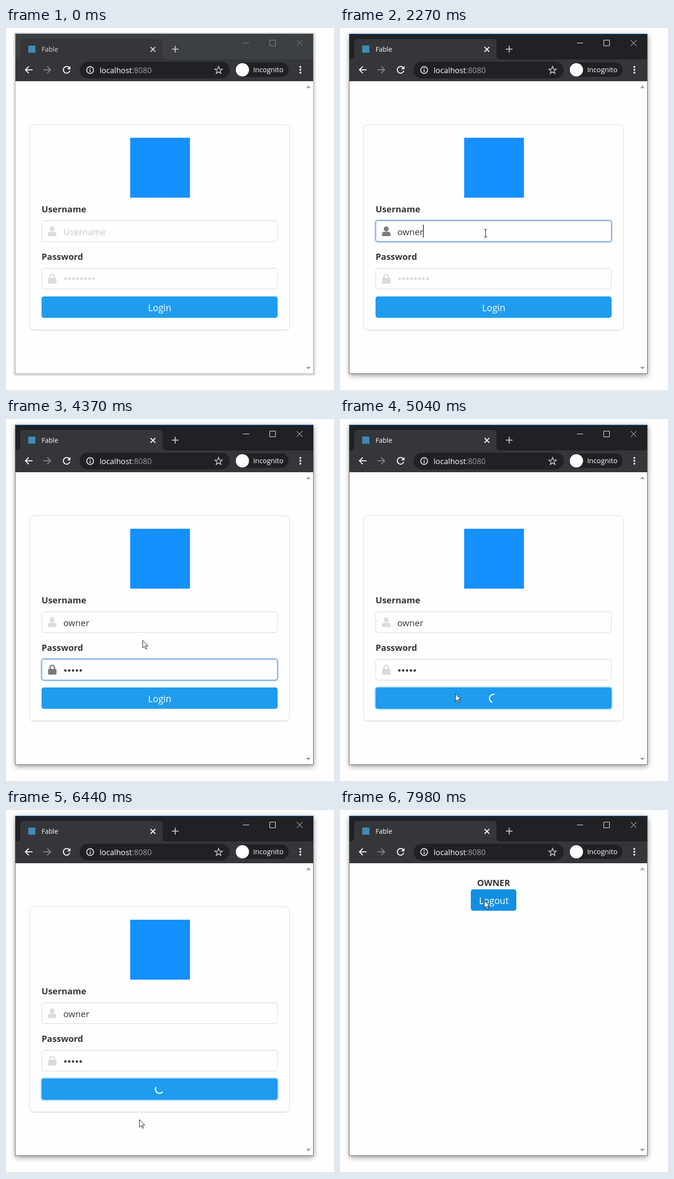
An HTML page for the animation above (8000 ms loop, 692 by 764 pixels).

```html
<!DOCTYPE html>
<html lang="en">
<head>
<meta charset="utf-8">
<title>Login</title>
<style>
  html, body { margin: 0; width: 100%; height: 100%; overflow: hidden; background: #fefefe; }
  svg { display: block; width: 100%; height: 100%; }
  text { font: 18.4px "Open Sans", "Noto Sans", sans-serif; fill: #363636; }
  .bold { font-weight: 700; }
  .hint { fill: #c8c8c8; }
  .stars { font-size: 15.2px; }
  .mid { text-anchor: middle; }
  .onBlue { font-size: 19.3px; fill: #fff; }
  .line { fill: none; stroke-width: 2; }
</style>
</head>
<body>
<svg viewBox="0 0 692 764">
  <defs>
    <filter id="blur" x="-10%" y="-10%" width="120%" height="120%"><feGaussianBlur stdDeviation="6"/></filter>
    <filter id="soft" x="-10%" y="-10%" width="120%" height="120%"><feGaussianBlur stdDeviation="1.2"/></filter>
  </defs>
  <rect width="692" height="764" fill="#fefefe"/>
  <rect y="763" width="692" height="1" fill="#cfcfcf"/>
  <rect id="shadowIdle" x="16" y="9" width="637" height="723" rx="5" fill="#dcdcdc" filter="url(#soft)"/>
  <rect id="shadowActive" x="20" y="15" width="629" height="716" fill="#000" opacity=".42" filter="url(#blur)"/>

  <rect id="frame" x="19" y="12" width="630" height="716"/>
  <rect x="20" y="112" width="628" height="615" fill="#fefefe"/>
  <rect id="titleBar" x="20" y="12" width="628" height="54"/>
  <rect id="accent" x="19" y="12" width="630" height="1" fill="#1a7fd4"/>
  <path d="M22 66Q30 66 30 58V31Q30 23 38 23H322Q330 23 330 31V58Q330 66 338 66H648V112H20V66Z" fill="#35363a"/>
  <rect x="47" y="37" width="15" height="15" fill="#3d8db5"/>
  <text id="tabTitle" x="75" y="50" style="font-size:14px">Fable</text>
  <path id="tabClose" class="line" d="M305 40l10 10m0-10l-10 10"/>
  <path class="line" d="M350 44.500h14m-7-7v14" stroke="#c4c6c9"/>
  <path id="winButtons" class="line" style="stroke-width:1" d="M500 31.500h13M556.500 25.500h12v12h-12zM613.500 25.500l12 12m0-12l-12 12"/>

  <path class="line" d="M56 88H41m7-7l-7 7 7 7" stroke="#fff"/>
  <path class="line" d="M79 88H94m-7-7l7 7-7 7" stroke="#85868a"/>
  <path class="line" d="M134 84.500A7 7 0 1 0 134.700 90" stroke="#fff"/>
  <path d="M136 80v7h-7z" fill="#fff"/>
  <rect x="155" y="71" width="317" height="35" rx="17.500" fill="#202124"/>
  <circle class="line" cx="177.500" cy="88.500" r="7.200" stroke="#e3e4e6"/>
  <path class="line" d="M177.500 84v2m0 1.500v5.500" stroke="#e3e4e6"/>
  <text x="197.500" y="94.500" style="font-size:16.300px;fill:#fff">localhost<tspan fill="#9aa0a6">:8080</tspan></text>
  <path id="star" class="line" style="stroke-width:1.600" stroke="#c8cacd"/>
  <rect x="482.500" y="71.500" width="115" height="32.500" rx="16.200" fill="#202124" stroke="#434448"/>
  <circle cx="498.700" cy="88" r="14" fill="#fff"/>
  <text x="521.500" y="93" style="font-size:14.700px;fill:#fff">Incognito</text>
  <g fill="#fff"><circle cx="621" cy="82" r="2"/><circle cx="621" cy="88" r="2"/><circle cx="621" cy="94" r="2"/></g>
  <path d="M633 126.500l5-5.500 5 5.500zM633 713l5 5.500 5-5.500z" fill="#a3a3a3"/>

  <g id="loginPage">
    <rect x="49.500" y="205" width="549" height="431.500" rx="9" fill="#d0d0d0"/>
    <rect x="49.500" y="203.500" width="549" height="432" rx="9" fill="#fefefe" stroke="#dcdcdc"/>
    <rect x="262" y="231" width="126" height="126" fill="#1590ff"/>
    <text class="bold" x="75" y="388">Username</text>
    <text class="bold" x="75" y="488">Password</text>
    <g id="nameField">
      <rect class="ring" x="72.500" y="402.500" width="503" height="50" rx="7"/>
      <rect class="box" x="75.500" y="405.500" width="497" height="44" rx="5" fill="#fefefe"/>
      <path d="M78 406.800H570" stroke="#f0f0f0"/>
      <path class="icon" d="M97.500 417.500a5.200 5.200 0 0 1 0 10.400a5.200 5.200 0 0 1 0-10.400M94 428.800h7q5.500 0 5.500 5.500v2q0 1.700-1.700 1.700h-14.600q-1.700 0-1.700-1.700v-2q0-5.500 5.500-5.500z"/>
    </g>
    <g id="passField">
      <rect class="ring" x="72.500" y="502.500" width="503" height="50" rx="7"/>
      <rect class="box" x="75.500" y="505.500" width="497" height="44" rx="5" fill="#fefefe"/>
      <path d="M78 506.800H570" stroke="#f0f0f0"/>
      <rect class="icon" x="88.700" y="526" width="17.800" height="12" rx="2"/>
      <path class="icon lock" d="M93 527v-4a4.600 4.600 0 0 1 9.200 0v4" style="fill:none;stroke-width:2.600"/>
    </g>
    <text id="nameHint" class="hint" x="121.500" y="436">Username</text>
    <text id="passHint" class="hint stars" x="121.500" y="535">********</text>
    <text id="nameText" x="121" y="436" style="font-size:18.600px"></text>
    <g id="dots" fill="#363636"></g>
    <rect id="caret" width="1.500" height="27" fill="#222"/>
    <rect id="loginRing" x="72.500" y="562.500" width="503" height="50" rx="7" fill="#209cee" opacity=".28"/>
    <rect id="loginButton" x="75" y="565" width="498" height="45" rx="5"/>
    <text id="loginLabel" class="onBlue mid" x="324.300" y="596">Login</text>
    <path id="spinner" d="M6.200 6.200A8.800 8.800 0 0 1 -6.200 -6.200" fill="none" stroke="#fff" stroke-width="2.500"/>
  </g>

  <g id="homePage">
    <text class="bold mid" x="324" y="160">OWNER</text>
    <rect id="logoutButton" x="276" y="167" width="96" height="45" rx="5"/>
    <text class="onBlue mid" x="324.500" y="198">Logout</text>
  </g>

  <circle id="halo" r="15" fill="#ffff75"/>
  <path id="arrow" d="M.5 .5V16.500L4.200 13L6.800 19L9.300 17.900L6.700 12H11.800Z" fill="#fff" stroke="#111"/>
  <path id="beam" d="M-3.500 -8H-1.200L0 -7L1.200 -8H3.500M0 -7V7M-3.500 8H-1.200L0 7L1.200 8H3.500" fill="none" stroke="#222" stroke-width="1.200"/>
</svg>
<script>
const LOOP = 8000;
const USER = 'owner';
const BLUE = '#209cee', HOVER = '#1496ed', PRESSED = '#118fe4';
const nameKeys = [1570, 1820, 2020, 2150, 2270];
const passKeys = [2840, 2970, 3180, 3300, 3420];
const focusName = 790, focusPass = 2480, pressLogin = 4770, startLoad = 4920, showHome = 6460, pressLogout = 7850;

// Pointer path: [time, x, y]
const route = [
  [140, 425, 738], [270, 384, 635], [450, 335, 535], [530, 320, 500], [680, 307, 430],
  [1160, 307, 430], [1160, 307, 432], [4150, 307, 432], [4370, 288, 465], [4690, 243, 578],
  [5350, 243, 578], [5700, 281, 651], [6740, 281, 651], [6950, 250, 515], [7060, 246, 455],
  [7160, 262, 403], [7290, 285, 325], [7520, 298, 198], [7590, 304, 194],
  [7850, 304, 194], [7850, 304, 190], [LOOP, 304, 190]
];

const $ = id => document.getElementById(id);
const set = (node, attrs) => { for (const k in attrs) node.setAttribute(k, attrs[k]); };
const show = (id, on) => $(id).style.display = on ? '' : 'none';
const within = (t, a, b) => t >= a && t < b;
const typed = (keys, t) => keys.filter(k => t >= k).length;

$('star').setAttribute('d', 'M' + Array.from({ length: 10 }, (_, i) => {
  const r = i % 2 ? 3.5 : 8.3, a = i * Math.PI / 5;
  return [448.5 + r * Math.sin(a), 89 - r * Math.cos(a)].map(v => v.toFixed(1));
}).join('L') + 'Z');

const dots = passKeys.map((_, i) => {
  const dot = document.createElementNS('http://www.w3.org/2000/svg', 'circle');
  set(dot, { cx: 125.2 + 8.1 * i, cy: 529.3, r: 2.5 });
  return $('dots').appendChild(dot);
});

function pointerAt(t) {
  let i = 1;
  while (i < route.length - 1 && t >= route[i][0]) i++;
  const [t0, x0, y0] = route[i - 1], [t1, x1, y1] = route[i];
  const p = Math.max(0, Math.min(1, (t - t0) / (t1 - t0)));
  return [x0 + (x1 - x0) * p, y0 + (y1 - y0) * p];
}

function drawField(id, focused) {
  const field = $(id), tone = focused ? '#7a7a7a' : '#dbdbdb';
  set(field.querySelector('.ring'), { fill: '#3273dc', opacity: focused ? 0.25 : 0 });
  set(field.querySelector('.box'), { stroke: focused ? '#3273dc' : '#d8d8d8' });
  field.querySelectorAll('.icon').forEach(part =>
    set(part, part.classList.contains('lock') ? { stroke: tone } : { fill: tone }));
}

function drawWindow(active) {
  show('shadowActive', active);
  show('shadowIdle', !active);
  show('accent', active);
  set($('frame'), { fill: active ? '#626466' : '#a9a9a9' });
  set($('titleBar'), { fill: active ? '#202124' : '#3c4043' });
  set($('winButtons'), { stroke: active ? '#fff' : '#8c8e90' });
  set($('tabClose'), { stroke: active ? '#fff' : '#d5d6d8' });
  $('tabTitle').style.fill = active ? '#fff' : '#d5d6d8';
}

function drawCaret(t, inName, inPass, letters, bullets) {
  const blinkOff = within(t, 1370, 1570) || within(t, 3940, 4440);
  show('caret', (inName || inPass) && !blinkOff);
  const x = inName
    ? 121.3 + (letters ? $('nameText').getComputedTextLength() - 1 : 0)
    : 121.3 + 8.1 * bullets;
  set($('caret'), { x, y: inName ? 414 : 514 });
}

function drawPointer(t, x, y) {
  const beam = t < showHome && x > 75 && x < 573 && (within(y, 405, 450) || within(y, 505, 550));
  const place = `translate(${x} ${y})`;
  show('beam', t >= 140 && beam);
  show('arrow', t >= 140 && !beam);
  set($('beam'), { transform: place });
  set($('arrow'), { transform: place });
  show('halo', within(t, focusName, 910) || within(t, pressLogin, startLoad) || within(t, pressLogout, 7980));
  set($('halo'), { cx: beam ? x - 2 : x, cy: beam ? y - 1 : y });
}

function render(t) {
  const letters = typed(nameKeys, t), bullets = typed(passKeys, t);
  const inName = within(t, focusName, focusPass), inPass = within(t, focusPass, pressLogin);
  const loading = t >= startLoad;
  const [x, y] = pointerAt(t);

  drawWindow(t >= focusName);
  show('loginPage', t < showHome);
  show('homePage', t >= showHome);
  drawField('nameField', inName);
  drawField('passField', inPass);

  show('nameHint', !letters);
  show('passHint', !bullets);
  $('nameText').textContent = USER.slice(0, letters);
  dots.forEach((dot, i) => dot.style.display = i < bullets ? '' : 'none');
  drawCaret(t, inName, inPass, letters, bullets);

  const overLogin = !loading && t > 1000 && within(y, 565, 610);
  set($('loginButton'), { fill: !overLogin ? BLUE : t >= pressLogin ? PRESSED : HOVER });
  show('loginRing', loading);
  show('loginLabel', !loading);
  show('spinner', loading);
  set($('spinner'), { transform: `translate(323.500 588) rotate(${(t - 4956) * 0.72})` });

  set($('logoutButton'), { fill: t >= pressLogout ? PRESSED : y < 212 ? HOVER : BLUE });
  drawPointer(t, x, y);
}

const start = performance.now();
function tick() {
  render((performance.now() - start) % LOOP);
  requestAnimationFrame(tick);
}
tick();
</script>
</body>
</html>
```
